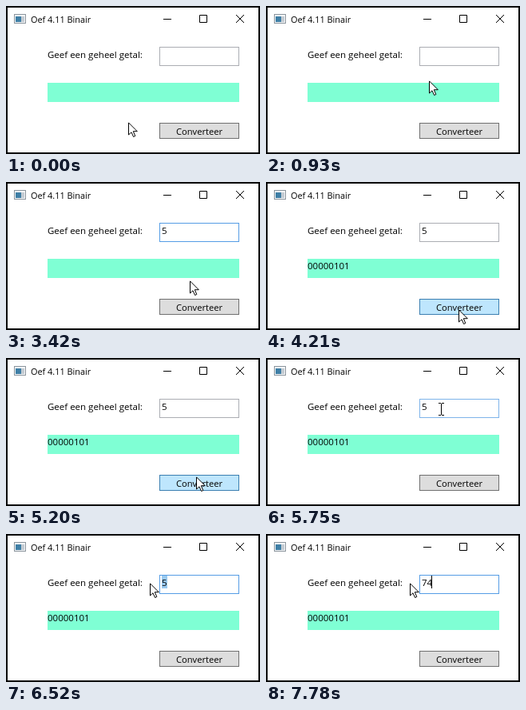
Animation, 318 px wide and 185 px high, one loop 8 s. Source, as an HTML page:

```html
<!DOCTYPE html>
<html lang="nl">
<head>
<meta charset="utf-8">
<title>Binair</title>
<style>
  html, body { margin: 0; height: 100%; overflow: hidden; background: #000; }
  svg { display: block; }
  text { font: 11.5px "Open Sans", "Noto Sans", sans-serif; white-space: pre; }
  .title { font-size: 10.9px; }
  .button { font-size: 11.2px; text-anchor: middle; }
  .line { fill: none; stroke: #000; }
</style>
</head>
<body>
<svg width="318" height="185" viewBox="0 0 318 185">
  <rect x="2" y="2" width="314" height="181" fill="#fff"/>

  <!-- title bar -->
  <rect x="10.5" y="10.5" width="14" height="11" fill="#f4f6f8" stroke="#8c959d"/>
  <rect x="12" y="13" width="7" height="7" fill="#3f7fa6"/>
  <rect x="19" y="13" width="4" height="7" fill="#c3cbd2"/>
  <text class="title" x="31" y="21">Oef 4.11 Binair</text>
  <path class="line" d="M197 16.5h10M242.5 11.5h9v9h-9z"/>
  <path class="line" d="M288 11l10 10M298 11l-10 10"/>

  <text x="52" y="65">Geef een geheel getal:</text>
  <rect id="box" x="192.5" y="51.5" width="99" height="23" fill="#fff"/>
  <rect id="selection" x="195" y="52" width="7" height="16" fill="#99c9ef"/>
  <text id="entry" x="195" y="65"></text>
  <rect id="caret" y="52" width="1" height="16"/>

  <rect x="52" y="96" width="240" height="24" fill="#7fffd4"/>
  <text id="result" x="52" y="109"></text>

  <rect id="button" x="192.5" y="146.5" width="99" height="19"/>
  <text class="button" x="242" y="161">Converteer</text>

  <g id="mouse">
    <circle id="press" cx="-1" cy="-1" r="12" fill="#ff0" opacity=".5"/>
    <path id="arrow" fill="#fff" stroke="#000"
      d="M.5 .9V16l3.5-3.2 2.6 5.7 2.2-1-2.5-5.8h5z"/>
    <path id="beam" class="line" d="M-3 -7.5h3M1 -7.5h3M.5 -7V7M-3 7.5h3M1 7.5h3"/>
  </g>
</svg>
<script>
const LOOP = 8000, SAMPLE = 77.5, BLINK = 530;
const FOCUS = 1570, TYPE_5 = 2800, CONVERT = 4210, SELECT = 5990, TYPE_7 = 7310, TYPE_4 = 7780;

const $ = id => document.getElementById(id);
const show = (id, on) => $(id).style.display = on ? "" : "none";
const set = (id, name, value) => $(id).setAttribute(name, value);
const between = (t, a, b) => t >= a && t < b;

// Key points of the mouse path: time, x, y
const path = [
  [550, 153, 145], [930, 204, 93], [1315, 214, 67],
  [3190, 214, 67], [3560, 241, 162], [3975, 241, 159],
  [5120, 241, 159], [5730, 219, 64],
  [SELECT, 219, 64], [6200, 193, 61], [6430, 180, 61]
];

// The mouse is sampled at a low rate, so it moves in small jumps
function mouseAt(time) {
  const t = Math.floor(time / SAMPLE) * SAMPLE;
  const next = path.findIndex(p => p[0] > t);
  if (next < 1) return path.at(next).slice(1);
  const [t0, x0, y0] = path[next - 1], [t1, x1, y1] = path[next];
  const k = (t - t0) / (t1 - t0);
  return [Math.round(x0 + (x1 - x0) * k), Math.round(y0 + (y1 - y0) * k)];
}

function draw(t) {
  const [x, y] = mouseAt(t);
  const over = (top, bottom) => x > 193 && x < 292 && y >= top && y < bottom;
  const overBox = over(51, 75), overButton = over(146, 166);
  const focused = between(t, FOCUS, CONVERT) || t >= SELECT;
  const selected = between(t, SELECT, TYPE_7) && x < 198;
  const hidden = between(t, TYPE_5, 3280);
  const entry = t < TYPE_5 ? "" : t < TYPE_7 ? "5" : t < TYPE_4 ? "7" : "74";

  set("box", "stroke", focused ? "#569de5" : overBox ? "#7eb4ea" : "#abadb3");
  set("button", "fill", overButton ? "#bee6fd" : "#dddddd");
  set("button", "stroke", overButton ? "#3c7fb1" : "#707070");
  $("entry").textContent = entry;
  $("result").textContent = t < CONVERT ? "" : (5).toString(2).padStart(8, "0");
  show("selection", selected);

  // Every click or key restarts the caret's blinking
  const active = [FOCUS, TYPE_5, SELECT, TYPE_7, TYPE_4].findLast(a => a <= t);
  set("caret", "x", 195 + 6 * entry.length);
  show("caret", focused && !selected && (t - active) % (2 * BLINK) < BLINK);

  set("mouse", "transform", `translate(${x} ${y})`);
  show("press", between(t, 1480, 1630) || between(t, SELECT, 6520));
  show("arrow", !overBox && !hidden);
  show("beam", overBox && !hidden);
}

const begin = performance.now();
function tick() {
  draw((performance.now() - begin) % LOOP);
  requestAnimationFrame(tick);
}
tick();
</script>
</body>
</html>
```
